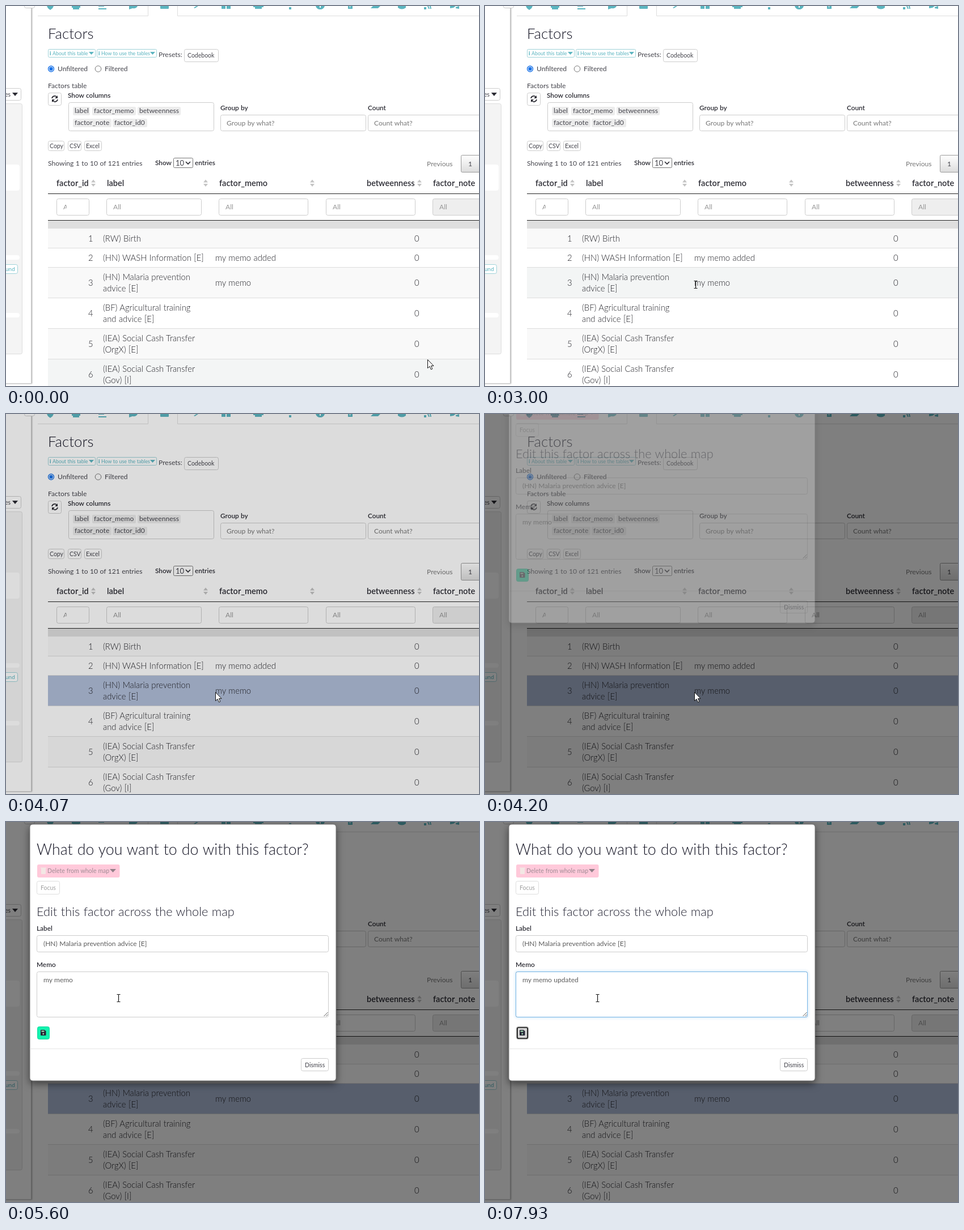
An HTML page that plays this animation: 834 px wide and 671 px high, repeating every 8000 ms.

```html
<!DOCTYPE html>
<html lang="en">
<head>
<meta charset="utf-8">
<title>Edit a factor</title>
<style>
  html, body { margin: 0; width: 100%; height: 100%; overflow: hidden; background: #fff; }
  svg { display: block; width: 834px; height: 671px; }
  text { font: 12.1px Lato, "Open Sans", sans-serif; word-spacing: .03em; fill: #44444c; white-space: pre; }
  .bold { font-weight: 600; font-size: 11.8px; fill: #2b2b33; }
  .head { font-weight: 600; font-size: 14.5px; fill: #2b2b33; }
  .cell { font-weight: 300; font-size: 14.8px; fill: #222228; }
  .title { font-weight: 300; font-size: 25.8px; fill: #151525; }
  .big { font-weight: 300; font-size: 26.7px; fill: #151525; }
  .sub { font-weight: 300; font-size: 21.7px; fill: #202030; }
  .small { font-size: 10.5px; }
  .tiny { font-size: 8.85px; fill: #58b3bf; }
  .hint { fill: #777; }
  .pale { fill: #999; }
  .field { font-size: 12px; fill: #5c5c5c; }
  .faint { font-size: 10.5px; fill: #a0a0a0; }
  .onpink { font-size: 10.5px; fill: #a08c95; }
</style>
</head>
<body>
<svg id="stage" viewBox="0 0 834 671"></svg>
<script>
const LOOP = 8000, STEP = 200 / 3;
const TEAL = '#5bb5c0', INK = '#2b2b33', LINE = '#ccc';

const rect = (x, y, w, h, fill, stroke = 'none', r = 0, extra = '') =>
  `<rect x="${x}" y="${y}" width="${w}" height="${h}" rx="${r}" fill="${fill}" stroke="${stroke}" ${extra}/>`;
const box = (x, y, w, h, stroke = LINE, fill = '#fff', r = 3) =>
  rect(x + .5, y + .5, w - 1, h - 1, fill, stroke, r);
const text = (x, y, s, cls = '', extra = '') => `<text x="${x}" y="${y}" class="${cls}" ${extra}>${s}</text>`;
const path = (d, fill, stroke = 'none', extra = '') => `<path d="${d}" fill="${fill}" stroke="${stroke}" ${extra}/>`;
const down = (x, y, w, h, fill) => path(`M${x} ${y}h${w}l${-w / 2} ${h}z`, fill);
const button = (x, y, w, h, label, tx, ty) => box(x, y, w, h) + text(tx, ty, label, 'small');

const ROWS = [
  [393, 34, ['(RW) Birth']],
  [427, 34, ['(HN) WASH Information [E]'], 'my memo added'],
  [461, 54, ['(HN) Malaria prevention', 'advice [E]'], 'my memo'],
  [515, 54, ['(BF) Agricultural training', 'and advice [E]']],
  [569, 54, ['(IEA) Social Cash Transfer', '(OrgX) [E]']],
  [623, 54, ['(IEA) Social Cash Transfer', '(Gov) [I]']]
];

function toolbar() {
  const solid = [
    'M72 0h12l-2 4-4 3-4-3z', 'M116 0h15v3h-2v3h-11v-3h-2z', 'M163 0h10v1h-10zM163 4h14v2h-14z',
    'M217 0h15q-2 5-9 4l-6 2z', 'M272 0h15v4q0 1-1 1h-13q-1 0-1-1z', 'M331 3l5-3h3l-6 4z',
    'M380 0h7v5h-7zM389 0h7v5h-7z', 'M436 0h18v2h-3v3h-12v-3h-3z', 'M499 2h4v4h-4z',
    'M546 0h16q-2 6-8 6t-8-6z', 'M603 0h8v5h-8z', 'M643 4l4-4h13l-4 4z',
    'M691 0h14v3q-7 5-14 0z', 'M737 2h4v4h-4zM743 0h2l2 5h-2zM747 0h2l1 5h-2z',
    'M783 0h10l-4 3-6 1zM793 2l6-2 0 5-6-1z'
  ];
  return path('M56 17.5H250.5V0M302.5 0V17.5H834', 'none', '#ddd') +
    path(solid.join(''), TEAL) + rect(553, 0, 2, 3, '#fff') + rect(605, 1, 3, 1, '#fff');
}

function sidebar() {
  return rect(-9.5, -9.5, 54, 676, '#fff', '#c9c9c9', 0, 'style="filter:drop-shadow(1px 0 1px #aaa)"') +
    box(32, -15, 19, 19) +
    box(-10, 145, 37, 22) + text(-2, 160, 'es', 'small') + down(11, 153, 10, 6, INK) +
    box(-10, 172, 39, 443, '#ddd', '#f4f4f4') +
    rect(-9, 280, 33, 46, '#fff', 'none', 4) +
    rect(-9, 440, 33, 8, '#fff', 'none', 4) + rect(-9, 542, 33, 8, '#fff', 'none', 4) +
    box(-10, 456, 31, 17, '#9fd2d8') + text(-1, 468, 'und', 'tiny', 'style="font-size:10px"');
}

function controls() {
  const info = (x, w, label) => box(x, 76, w, 15, '#9fd2d8', '#fff', 2) +
    text(x + 3, 87, 'i', 'tiny', 'style="font-weight:900"') + text(x + 8, 87, label, 'tiny') +
    down(x + w - 12, 81, 9, 5, TEAL);
  const tag = (x, y, w, label) => rect(x, y, w, 15, '#ececec', 'none', 2) + text(x + 3, y + 11, label);
  return text(74, 58, 'Factors', 'title') +
    info(74, 84, 'About this table') + info(160, 106, 'How to use the tables') +
    text(269, 90, 'Presets:') + button(314, 76, 61, 23, 'Codebook', 320, 91) +
    `<circle cx="79.5" cy="111" r="5" fill="#fff" stroke="#1a73e8" stroke-width="1.4"/><circle cx="79.5" cy="111" r="3.2" fill="#1a73e8"/>` +
    `<circle cx="162.5" cy="111" r="5.3" fill="#fff" stroke="#767676"/>` +
    text(91, 115, 'Unfiltered') + text(174, 115, 'Filtered') + text(74, 145, 'Factors table') +
    box(74, 153, 24, 23) +
    path('M81 163a5 5 0 0 1 8.5-2.5M91 165a5 5 0 0 1-8.5 2.5', 'none', INK, 'stroke-width="1.7"') +
    path('M91 158v5h-5zM81 170v-5h5z', INK) +
    text(109, 162, 'Show columns', 'bold') + box(110, 170, 257, 51) +
    tag(118, 178, 30, 'label') + tag(152, 178, 77, 'factor_memo') + tag(232, 178, 76, 'betweenness') +
    tag(118, 199, 68, 'factor_note') + tag(188, 199, 61, 'factor_id0') +
    text(378, 184, 'Group by', 'bold') + box(378, 192, 257, 29) + text(389, 211, 'Group by what?', 'hint') +
    text(638, 184, 'Count', 'bold') + box(638, 192, 257, 29) + text(649, 211, 'Count what?', 'hint') +
    button(74, 238, 29, 18, 'Copy', 77, 251) + button(109, 238, 24, 18, 'CSV', 112, 251) +
    button(138, 238, 31, 18, 'Excel', 141, 251) +
    text(74, 282, 'Showing 1 to 10 of 121 entries') +
    text(263, 281, 'Show', 'bold') + text(333, 281, 'entries', 'bold') +
    box(295, 268, 35, 18, '#767676', '#fff', 2) + text(299, 282, '10', '', 'style="font-size:13px"') +
    path('M317 275l4 4 4-4', 'none', INK, 'stroke-width="1.7"') +
    text(742, 283, 'Previous', 'hint') + box(802, 263, 50, 31, '#999', 'url(#page)', 2) + text(815, 283, '1');
}

function table() {
  const sort = x => path(`M${x - 4} 311.5h8l-4-5zM${x - 4} 314h8l-4 5z`, '#c4c4c4');
  const heads = [[89, 'factor_id'], [178, 'label'], [376, 'factor_memo'], [636, 'betweenness'], [753, 'factor_note']];
  const filters = [[89, 58], [177, 168], [375, 158], [564, 158], [752, 158]];
  let out = heads.map(([x, s]) => text(x, 318, s, 'head')).join('') + [154, 352, 540, 729].map(sort).join('') +
    rect(74, 331, 760, 1, '#222') + rect(74, 378, 760, 1, '#222') + rect(74, 379, 760, 14, '#dfdfdf');
  filters.forEach(([x, w], i) => {
    out += box(x, 340, w, 30, LINE, i === 4 ? '#eee' : '#fff') +
      text(x + 12, 359, i ? 'All' : 'A', 'pale', i ? '' : 'clip-path="url(#narrow)"');
  });
  ROWS.forEach(([y, h, label, memo], i) => {
    const mid = y + h / 2 + 6;
    out += `<rect id="row${i}" x="74" y="${y}" width="760" height="${h}"/>` + rect(74, y, 760, 1, i ? '#ddd' : 'none') +
      text(153.5, mid, i + 1, 'cell', 'text-anchor="end"') + text(728.5, mid, 0, 'cell', 'text-anchor="end"') +
      label.map((s, k) => text(171, mid + (label.length > 1 ? k * 20 - 10 : 0), s, 'cell')).join('') +
      (memo ? text(369, mid, memo, 'cell') : '');
  });
  return out;
}

function dialog() {
  return rect(42, 4, 540, 453, '#fff', '#777', 5, 'style="filter:drop-shadow(0 5px 7px rgba(0,0,0,.5))"') +
    text(54, 57.5, 'What do you want to do with this factor?', 'big') +
    rect(55, 75, 145.5, 23, '#ffc9da', 'none', 3) + rect(62, 82, 8, 10, '#f3e7e4', 'none', 1) + rect(61, 80.5, 10, 1.5, '#f3e7e4') +
    text(73, 90, 'Delete from whole map', 'onpink') + down(183, 83, 11, 6, '#928088') +
    box(54, 104, 41, 24, '#ddd') + text(61, 120, 'Focus', 'faint') +
    text(54, 166, 'Edit this factor across the whole map', 'sub') +
    text(54, 192, 'Label', 'bold') + box(54, 200, 515, 30) +
    text(66, 219, '(HN) Malaria prevention advice [E]', 'field') +
    text(54, 255.5, 'Memo', 'bold') +
    `<g id="glow">${rect(54.5, 264.5, 514, 80, 'none', '#66afe9', 3, 'stroke-width="3" style="filter:blur(2px)"')}</g>` +
    box(54, 264, 515, 81) + `<g id="focus">${rect(54.5, 264.5, 514, 80, 'none', '#66afe9', 3)}</g>` +
    path('M560.5 343l7-7M564.5 343l3-3', 'none', '#555') +
    text(66, 283, '', 'field', 'id="memo"') + rect(0, 272, 1, 13, '#111', 'none', 0, 'id="caret"') +
    rect(55.5, 361.5, 21, 22, '#13f3ae', '#10dba0', 3, 'id="save"') +
    `<g id="pressed">${rect(55.5, 361.5, 21, 22, '#e4e4e4', '#aaa', 3)}${rect(57, 363, 18, 19, '#d8d8d8', '#111', 2, 'stroke-width="1.7"')}</g>` +
    path('M61 368q0-1 1-1h6l2.5 2.5v6.5q0 1-1 1h-7.500q-1 0-1-1z', '#252535') +
    rect(62.5, 368.3, 5, 2.4, '#9ca') + `<circle cx="65.8" cy="374" r="1.5" fill="#9ca"/>` +
    rect(42.5, 400, 539, 1, '#e5e5e5') + button(520, 417, 49, 23, 'Dismiss', 527, 432.5);
}

const stage = document.getElementById('stage');
stage.innerHTML = `<defs>
  <linearGradient id="page" x2="0" y2="1"><stop stop-color="#fff"/><stop offset="1" stop-color="#dcdcdc"/></linearGradient>
  <clipPath id="narrow"><rect x="101" y="345" width="6" height="20"/></clipPath></defs>` +
  rect(0, 0, 834, 671, '#fff') + toolbar() + sidebar() + controls() + table() +
  rect(0, 0, 834, 671, '#000', 'none', 0, 'id="shade"') +
  `<g id="dialog">${dialog()}</g>` +
  `<g id="pointer">${path('M.5 .5V15.5L4 12.3 6.4 17.8 8.8 16.8 6.5 11.4H11z', '#fff', '#111')}</g>` +
  `<g id="beam">${path('M-3 -6.5H-.8L0-6 .8-6.5H3M-3 6.5H-.8L0 6 .8 6.5H3M0-6V6', 'none', '#111', 'stroke-width="1.2"')}</g>`;

const el = {};
stage.querySelectorAll('[id]').forEach(node => el[node.id] = node);
const show = (node, on) => node.setAttribute('visibility', on ? 'inherit' : 'hidden');
const clamp = v => Math.max(0, Math.min(1, v));
const smooth = u => u * u * (3 - 2 * u);

// Cubic Bezier (0, 0, .58, 1), solved for x by bisection.
function easeOut(x) {
  let lo = 0, hi = 1;
  for (let i = 0; i < 20; i++) {
    const s = (lo + hi) / 2;
    if (3 * .58 * (1 - s) * s * s + s ** 3 < x) lo = s; else hi = s;
  }
  return smooth(lo);
}

const PATH = [
  [0, 743, 624], [867, 430, 487], [1267, 455, 510], [1733, 374, 491], [2000, 370, 490], [2133, 370, 490],
  [2600, 395, 342], [3000, 371, 492], [3900, 371, 492], [3930, 369, 491], [4333, 369, 491],
  [4867, 300, 427], [5600, 198, 310.5], [8000, 198, 310.5]
];
function pointerAt(t) {
  const i = Math.max(1, PATH.findIndex(k => k[0] >= t));
  const [t0, x0, y0] = PATH[i - 1], [t1, x1, y1] = PATH[i];
  const u = smooth(clamp((t - t0) / (t1 - t0)));
  return [x0 + (x1 - x0) * u, y0 + (y1 - y0) * u];
}

const TYPED = ' updated', KEY_TIMES = [6330, 6660, 6800, 6930, 7060, 7260, 7330, 7530];
const OPEN_AT = 4162, SLIDE = 270, FADE = 150;
const inside = (x, y, l, t, r, b) => x >= l && x <= r && y >= t && y <= b;

function draw(time) {
  const t = Math.floor((time + 3.5) / STEP) * STEP;
  const [x, y] = pointerAt(t);
  const open = t > OPEN_AT;

  ROWS.forEach(([top, h], i) => {
    const hover = t < 4000 && y >= top && y < top + h;
    el['row' + i].setAttribute('fill', i === 2 && t > 3590 ? '#b0bed9' : hover ? '#f3f5f5' : i % 2 ? '#fff' : '#f9f9f9');
  });

  el.shade.setAttribute('opacity', t > 4060 ? .5 * clamp((t - 4025) / FADE) : 0);
  show(el.dialog, open);
  el.dialog.setAttribute('opacity', clamp((t - OPEN_AT) / FADE));
  el.dialog.setAttribute('transform', `translate(0 ${-113 * (1 - easeOut(clamp((t - OPEN_AT) / SLIDE)))})`);

  const pressed = t > 7925;
  const focus = pressed ? .85 : clamp((t - 5733) / FADE);
  el.glow.setAttribute('opacity', focus * .4);
  el.focus.setAttribute('opacity', focus);
  el.memo.textContent = 'my memo' + TYPED.slice(0, KEY_TIMES.filter(k => t >= k).length);
  el.caret.setAttribute('x', Math.round(66 + el.memo.getComputedTextLength()));
  show(el.caret, open && t > 5725 && !pressed && !(t > 6260 && t < 6330));
  show(el.pressed, pressed);
  show(el.save, !pressed);

  const overText = open ? inside(x, y, 55, 265, 568, 344)
    : t < 3925 && (inside(x, y, 366, 478, 435, 500) || inside(x, y, 366, 435, 478, 456) || inside(x, y, 376, 340, 533, 370));
  show(el.beam, overText);
  show(el.pointer, !overText);
  const place = `translate(${Math.round(x) + (overText ? .5 : 0)} ${Math.round(y)})`;
  el.beam.setAttribute('transform', place);
  el.pointer.setAttribute('transform', place);
}

const start = performance.now();
function tick() {
  draw((performance.now() - start) % LOOP);
  requestAnimationFrame(tick);
}
tick();
</script>
</body>
</html>
```
